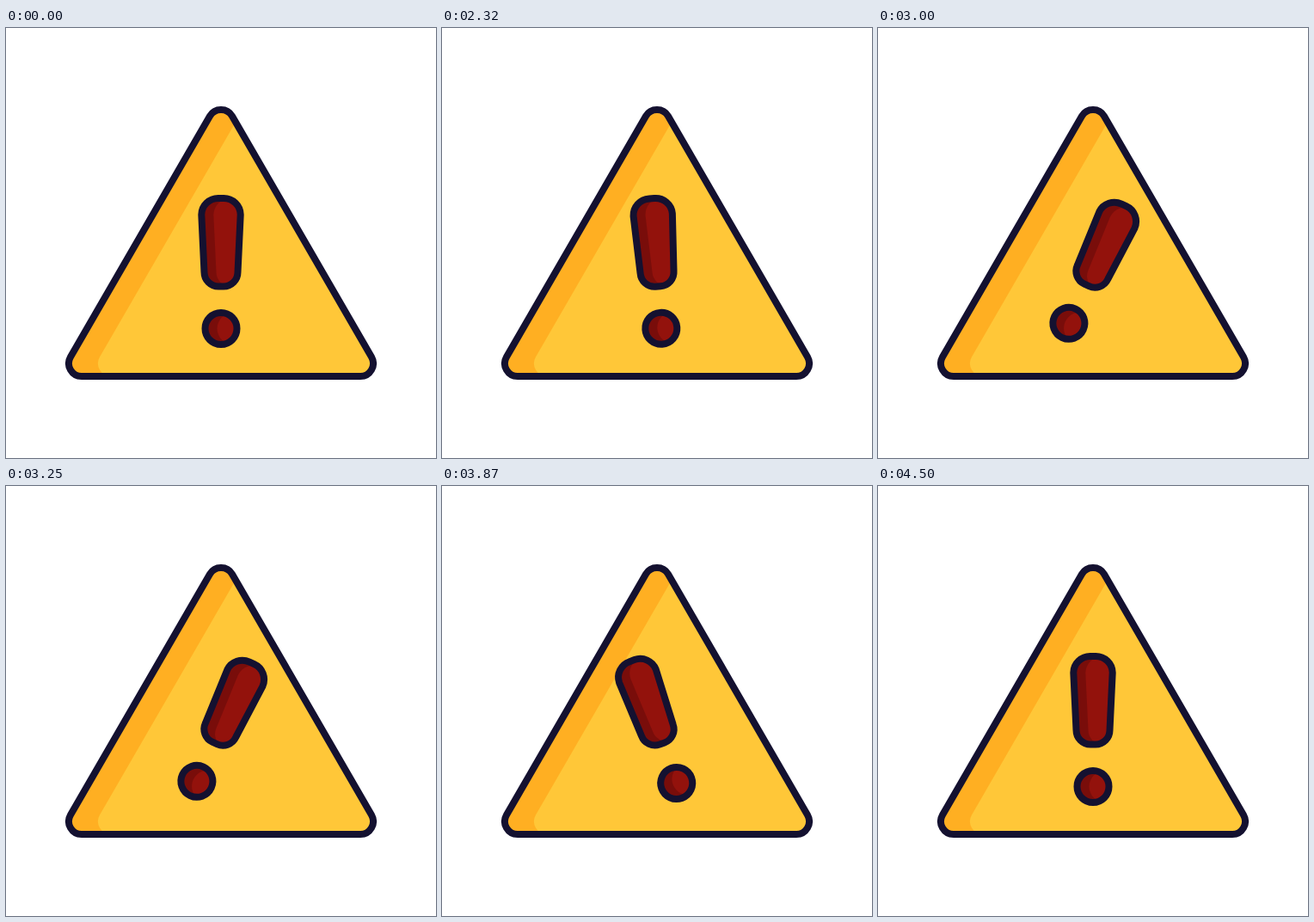
These frames come from a looping animation (500 by 500 pixels, 4.52 s). An HTML page:

```html
<!DOCTYPE html>
<html lang="en">
<head>
<meta charset="utf-8">
<title>Warning sign</title>
<style>
  html, body { margin: 0; width: 100%; height: 100%; overflow: hidden; background: #fff; }
  svg { display: block; width: 100%; height: 100%; }
  .line { fill: none; stroke: #141130; stroke-width: 8; }
  .amber { fill: #ffaf22; }
  .yellow { fill: #ffc738; }
  .maroon { fill: #790d0a; }
  .red { fill: #93120c; }
</style>
</head>
<body>
<svg viewBox="0 0 500 500">
  <defs>
    <path id="sign" d="M237 102.5A15 15 0 0 1 263 102.5L425 382.5A15 15 0 0 1 412 405H88A15 15 0 0 1 75 382.5Z"/>
    <path id="bar" d="M227.3 217A19.5 19.5 0 0 1 247 198H253A19.5 19.5 0 0 1 272.7 217L269.5 284A16.5 16.5 0 0 1 253 300.5H247A16.5 16.5 0 0 1 230.5 284Z"/>
    <circle id="dot" cx="250" cy="349.5" r="18.5"/>
    <clipPath id="inSign"><use href="#sign"/></clipPath>
    <clipPath id="inBar"><use href="#bar"/></clipPath>
    <clipPath id="inDot"><use href="#dot"/></clipPath>
  </defs>

  <use href="#sign" class="amber"/>
  <g clip-path="url(#inSign)"><use href="#sign" x="34" class="yellow"/></g>
  <use href="#sign" class="line"/>

  <g id="mark">
    <use href="#bar" class="maroon"/>
    <g clip-path="url(#inBar)"><use href="#bar" x="14" class="red"/></g>
    <use href="#bar" class="line"/>
    <use href="#dot" class="maroon"/>
    <g clip-path="url(#inDot)"><use href="#dot" x="14" class="red"/></g>
    <use href="#dot" class="line"/>
  </g>
</svg>
<script>
  const LOOP = 4520, REST = 2020;
  const SWINGS = 20, STEPS = 5;
  const mark = document.getElementById('mark');
  const start = performance.now();

  // Turning points: upright at both ends, alternating left and right between.
  const turn = i => i <= 0 || i >= SWINGS ? 0 : i % 2 ? -20 : 25;
  const ease = x => x * x * (3 - 2 * x);

  // 40 steps a second, held for 30 and 20 ms in turn.
  function stepAt(ms) {
    if (ms < REST) return 0;
    const t = ms - REST;
    return 1 + 2 * Math.floor(t / 50) + (t % 50 >= 30 ? 1 : 0);
  }

  function angleAt(step) {
    const i = Math.floor(step / STEPS);
    return turn(i) + (turn(i + 1) - turn(i)) * ease(step / STEPS - i);
  }

  function draw() {
    const angle = angleAt(stepAt((performance.now() - start) % LOOP));
    mark.setAttribute('transform', `rotate(${angle} 250 283)`);
    requestAnimationFrame(draw);
  }
  draw();
</script>
</body>
</html>
```
